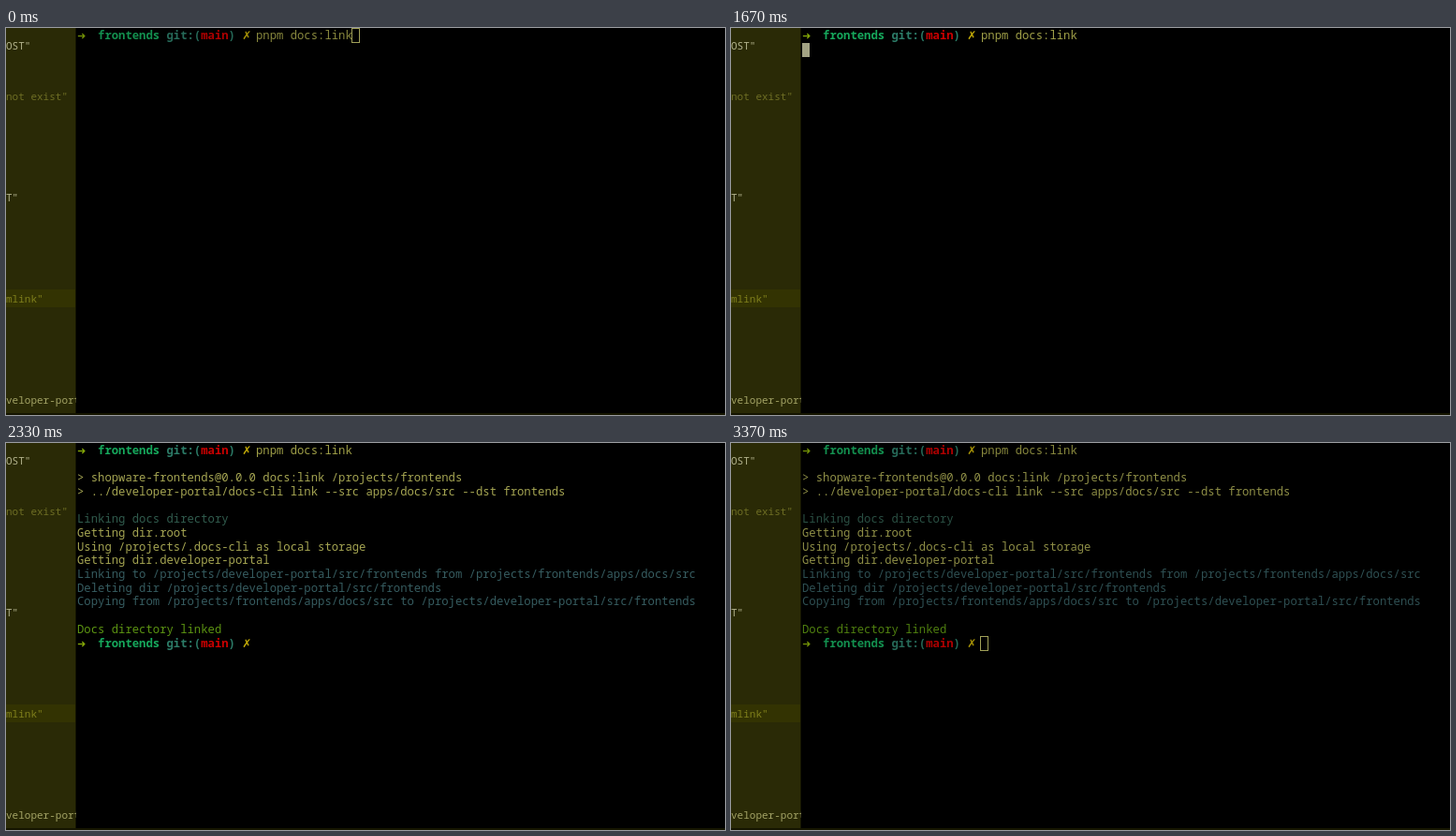
Recreate the animation shown at these times as an HTML page with a canvas. Size 768 by 413 pixels, loop 3410 ms.

```html
<!DOCTYPE html>
<html lang="en">
<head>
<meta charset="utf-8">
<title>Terminal</title>
<style>
html, body { margin: 0; width: 100%; height: 100%; overflow: hidden; background: #000; }
canvas { display: block; }
</style>
</head>
<body>
<canvas id="stage" width="768" height="413"></canvas>
<script>
const ctx = document.getElementById('stage').getContext('2d');
const LOOP = 3410, LEFT = 76, CELL = 7.344, ROW = 14.68;
const MONO = '"Noto Sans Mono", "DejaVu Sans Mono", monospace';
const SYMBOL = '"DejaVu Sans", "DejaVu Sans Mono", sans-serif';

const PLAIN = '#a5a552', MUTED = '#315c4e', BLUE = '#365c60', DONE = '#5c9412';
// time, row, colour, text
const output = [
  [1900, 2, PLAIN, '> shopware-frontends@0.0.0 docs:link /projects/frontends'],
  [1900, 3, PLAIN, '> ../developer-portal/docs-cli link --src apps/docs/src --dst frontends'],
  [2130, 5, MUTED, 'Linking docs directory'],
  [2130, 6, PLAIN, 'Getting dir.root'],
  [2130, 7, PLAIN, 'Using /projects/.docs-cli as local storage'],
  [2130, 8, PLAIN, 'Getting dir.developer-portal'],
  [2130, 9, BLUE, 'Linking to /projects/developer-portal/src/frontends from /projects/frontends/apps/docs/src'],
  [2130, 10, BLUE, 'Deleting dir /projects/developer-portal/src/frontends'],
  [2130, 11, BLUE, 'Copying from /projects/frontends/apps/docs/src to /projects/developer-portal/src/frontends'],
  [2230, 13, DONE, 'Docs directory linked']
];

// start, end, row, column, filled
const cursors = [
  [0, 900, 0, 40, false],
  [900, 1400, 0, 40, true],
  [1670, 1900, 1, 0, true],
  [1900, 2130, 5, 0, true],
  [3200, LOOP, 14, 26, false]
];

const editor = [
  [23, '#b2b28c', 'OST"'],
  [77, '#6e6e24', 'not exist"'],
  [185, '#b2b28c', 'T"'],
  [293, '#80801c', 'mlink"'],
  [400.5, '#a3a365', 'veloper-port']
];

function box(color, x, y, w, h) {
  ctx.fillStyle = color;
  ctx.fillRect(x, y, w, h);
}

// Each character sits in its own cell.
function write(text, x, y, cell, color) {
  ctx.fillStyle = color;
  [...text].forEach((c, i) => ctx.fillText(c, x + i * cell, y));
}

function put(text, row, col, color, font = `12.24px ${MONO}`) {
  ctx.font = font;
  write(text, LEFT + col * CELL, 12 + row * ROW, CELL, color);
}

function prompt(row) {
  const bold = `bold 12.24px ${MONO}`;
  put('➜', row, 0, '#86aa08', `11px ${SYMBOL}`);
  put('frontends', row, 3, '#16a85c', bold);
  put('git:(', row, 13, '#2c7c68', bold);
  put('main', row, 18, '#cc0000', bold);
  put(')', row, 22, '#2c7c68', bold);
  put('✗', row, 24, '#c4ac08', `12px ${SYMBOL}`);
}

function drawEditor() {
  box('#2a2a06', 0, 0, 74, 411);
  box('#333302', 0, 279, 74, 19);
  box('#151502', 74, 0, 1, 411);
  box('#151500', 0, 411, 768, 2);
  ctx.save();
  ctx.beginPath();
  ctx.rect(0, 0, 75, 411);
  ctx.clip();
  ctx.font = `11px ${MONO}`;
  for (const [y, color, text] of editor) write(text, 0, y, 6.6, color);
  ctx.restore();
}

function drawCursor([, , row, col, filled]) {
  const x = Math.round(LEFT + col * CELL), y = Math.round(row * ROW) + 1;
  if (filled) {
    box('#a3a383', x, y, 8, 15);
  } else {
    ctx.strokeStyle = '#a0a058';
    ctx.strokeRect(x - 0.5, y - 0.5, 8, 15);
  }
}

const ramp = (t, from, to) => Math.min(1, Math.max(0, (t - from) / (to - from)));

function draw(t) {
  box('#000', 0, 0, 768, 413);
  drawEditor();
  // The terminal is dimmed while it has no focus.
  ctx.globalAlpha = 0.86 + 0.14 * (ramp(t, 770, 1070) - ramp(t, 2970, 3370));
  prompt(0);
  put('pnpm docs:link', 0, 26, '#a0a048');
  for (const [start, row, color, text] of output) {
    if (t >= start) put(text, row, 0, color);
  }
  if (t >= 2300) prompt(14);
  ctx.globalAlpha = 1;
  cursors.filter(([start, end]) => t >= start && t < end).forEach(drawCursor);
}

const begin = performance.now();
function frame() {
  draw((performance.now() - begin) % LOOP);
  requestAnimationFrame(frame);
}
frame();
</script>
</body>
</html>
```
